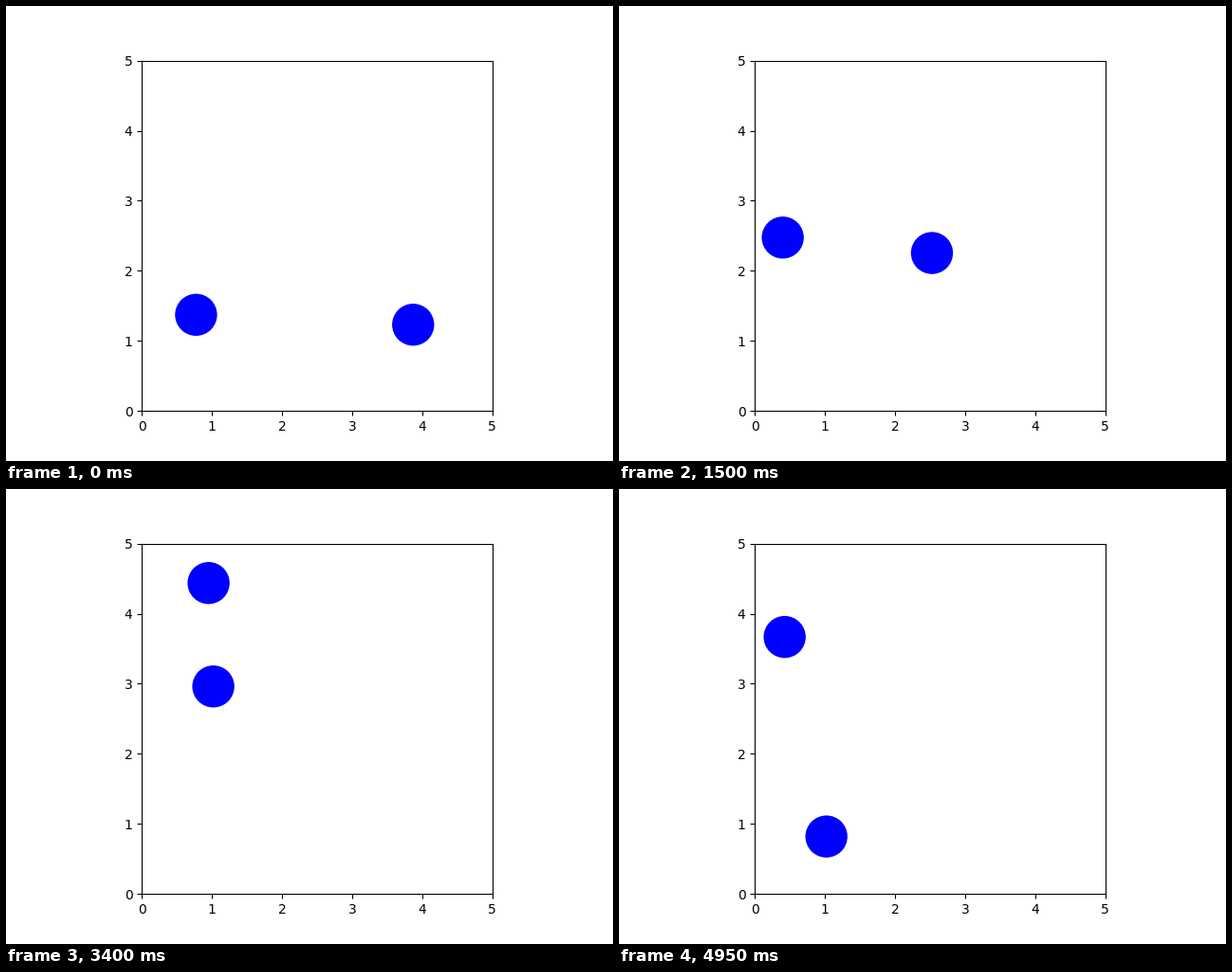
A matplotlib script that plays this animation: 640 by 480 pixels, repeating every 5000 ms.

```python
import numpy as np
import matplotlib.pyplot as plt
from matplotlib.animation import FuncAnimation

SIZE = 5
RADIUS = 0.3
FRAMES = 100

START = [(3.870, 1.231), (0.774, 1.372)]
SPEED = [(-0.04478, -0.0977), (-0.0197, 0.03675)]


def bounce_walls(pos, vel):
    low, high = RADIUS, SIZE - RADIUS
    vel[(pos < low) | (pos > high)] *= -1
    np.clip(pos, low, high, out=pos)


def collide(pos, vel):
    """Elastic hit of two equal discs, pushed apart until they just touch."""
    gap = pos[0] - pos[1]
    dist = np.hypot(*gap)
    if dist >= 2 * RADIUS:
        return
    normal = gap / dist
    push = (2 * RADIUS - dist) / 2 * normal
    impulse = np.dot(vel[0] - vel[1], normal) * normal
    pos += [push, -push]
    vel += [-impulse, impulse]


def simulate():
    pos, vel = np.array(START), np.array(SPEED)
    path = [pos.copy()]
    for _ in range(FRAMES - 1):
        pos += vel
        bounce_walls(pos, vel)
        collide(pos, vel)
        path.append(pos.copy())
    return path


path = simulate()

fig, ax = plt.subplots(figsize=(6.4, 4.8), dpi=100)
ax.set_xlim(0, SIZE)
ax.set_ylim(0, SIZE)
ax.set_aspect("equal")

balls = [plt.Circle(p, RADIUS, facecolor="blue", linewidth=0) for p in START]
for ball in balls:
    ax.add_patch(ball)


def update(frame):
    for ball, center in zip(balls, path[frame]):
        ball.center = center
    return balls


anim = FuncAnimation(fig, update, frames=FRAMES, interval=50,
                     repeat=True, repeat_delay=0)
plt.show()
```
